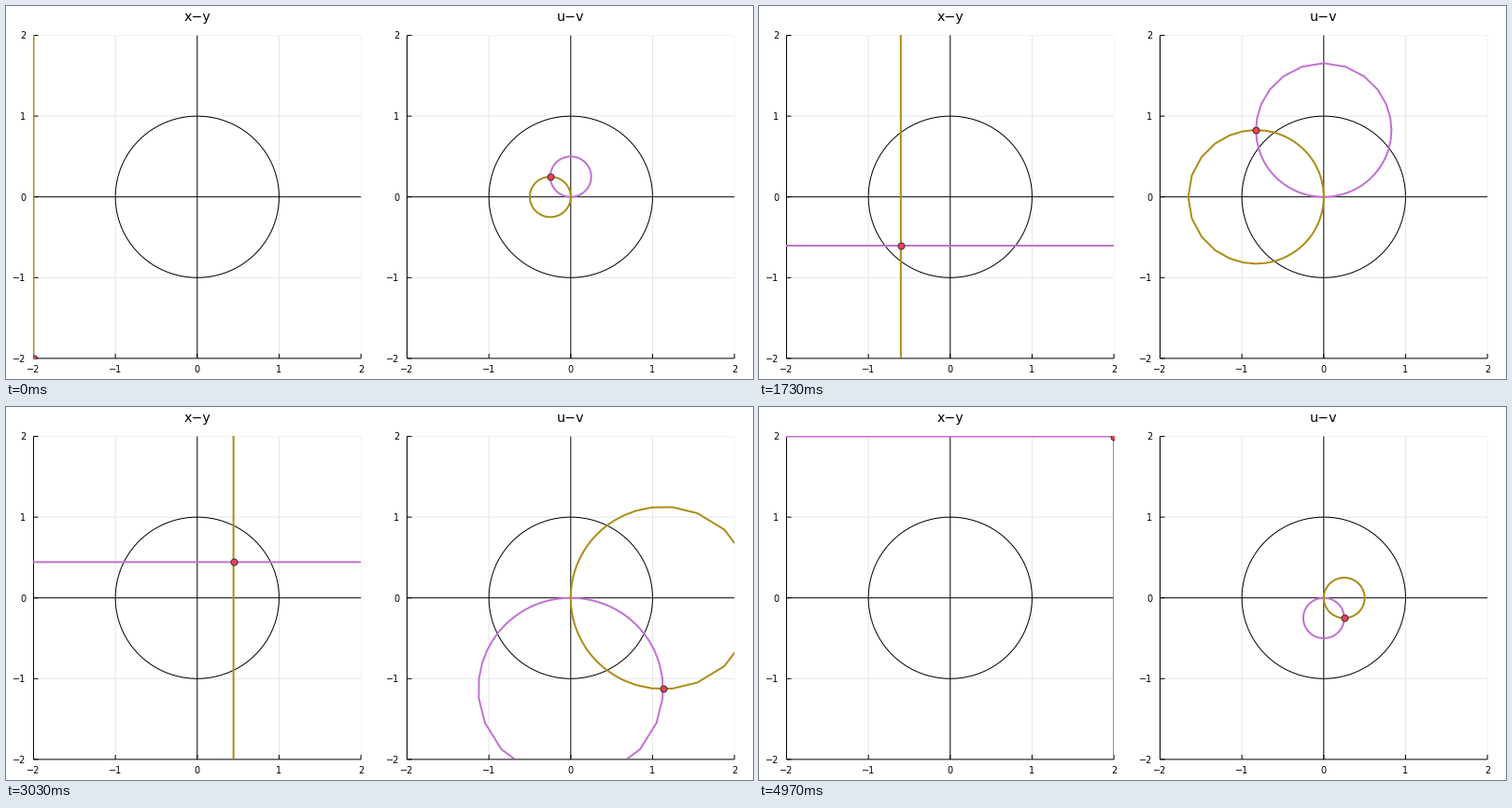
These frames come from a looping animation (800 by 400 pixels, 5010 ms). A matplotlib script:

```python
import numpy as np
import matplotlib.pyplot as plt
from matplotlib.animation import FuncAnimation
from matplotlib.transforms import Bbox

W, H, DPI = 800, 400, 100
PX = 72 / DPI  # one pixel in points
LOOP_MS, TICK_MS = 5010, 15
FPS, STEPS = 30, 150
PURPLE, GOLD, RED = "#c271d2", "#ac8d18", "#ee4055"
TOP, BOTTOM, WIDTH = 31.5, 377.9, 350.6

plt.rcParams["font.family"] = "DejaVu Sans"
fig = plt.figure(figsize=(W / DPI, H / DPI), dpi=DPI, facecolor="white")


def write(text, x, y, size, align="center"):
    """Text with its baseline at y pixels from the top."""
    fig.text(x / W, 1 - y / H, text, fontsize=size * PX, ha=align,
             va="baseline")


def panel(left, title):
    height = BOTTOM - TOP
    ax = fig.add_axes([left / W, 1 - BOTTOM / H, WIDTH / W, height / H])
    ax.set(xlim=(-2, 2), ylim=(-2, 2))
    ax.axis("off")

    def rule(x, y, color="black"):
        ax.plot(x, y, color=color, lw=PX, snap=False, clip_on=False,
                solid_capstyle="butt")

    ends = (-2, 2)
    for k, color in ((-1, "#e6e6e6"), (1, "#e6e6e6"), (2, "#f2f2f2"),
                     (0, "black"), (-2, "black")):
        rule((k, k), ends, color)
        rule(ends, (k, k), color)

    tick = 4 * 5 / WIDTH  # five pixels in data units
    for k in range(-2, 3):
        rule((k, k), (-2, -2 + tick))
        rule((-2, -2 + tick), (k, k))
        label = str(k).replace("-", "\u2212")
        part = (k + 2) / 4
        write(label, left + part * WIDTH, 392.6, 9.8)
        write(label, left - 8, BOTTOM - part * height + 3.9, 9.8, "right")
    write(title, left + WIDTH / 2, 15.6, 14.2)

    t = np.linspace(0, 2 * np.pi, 201)
    rule(np.cos(t), np.sin(t))

    clip = Bbox.from_extents(int(left), 23, int(left + WIDTH), 369)
    shapes = [ax.plot([], [], color=c, lw=2 * PX, snap=False)[0]
              for c in (PURPLE, GOLD)]
    shapes += ax.plot([], [], "o", color=RED, ms=7 * PX, mec="#333333",
                      mew=PX)
    for shape in shapes:
        shape.set_clip_box(clip)
    return shapes


plane = panel(29.5, "x\u2212y")
image = panel(429.5, "u\u2212v")
S = np.arange(-1000, 1001) / 10


def update(i):
    # The cross moves in 30 fps steps; the finer tick keeps their timing
    step = min(int((i + 1) * TICK_MS * FPS / 1000), STEPS - 1)
    c = -2 + 4 * step / (STEPS - 1)
    points = (S + 1j * c, c + 1j * S, np.array([c + 1j * c]))
    for z, before, after in zip(points, plane, image):
        w = 1 / z
        before.set_data(z.real, z.imag)
        after.set_data(w.real, w.imag)
    return (*plane, *image)


anim = FuncAnimation(fig, update, frames=LOOP_MS // TICK_MS,
                     interval=TICK_MS, repeat=True, repeat_delay=0,
                     blit=False)
plt.show()
```
